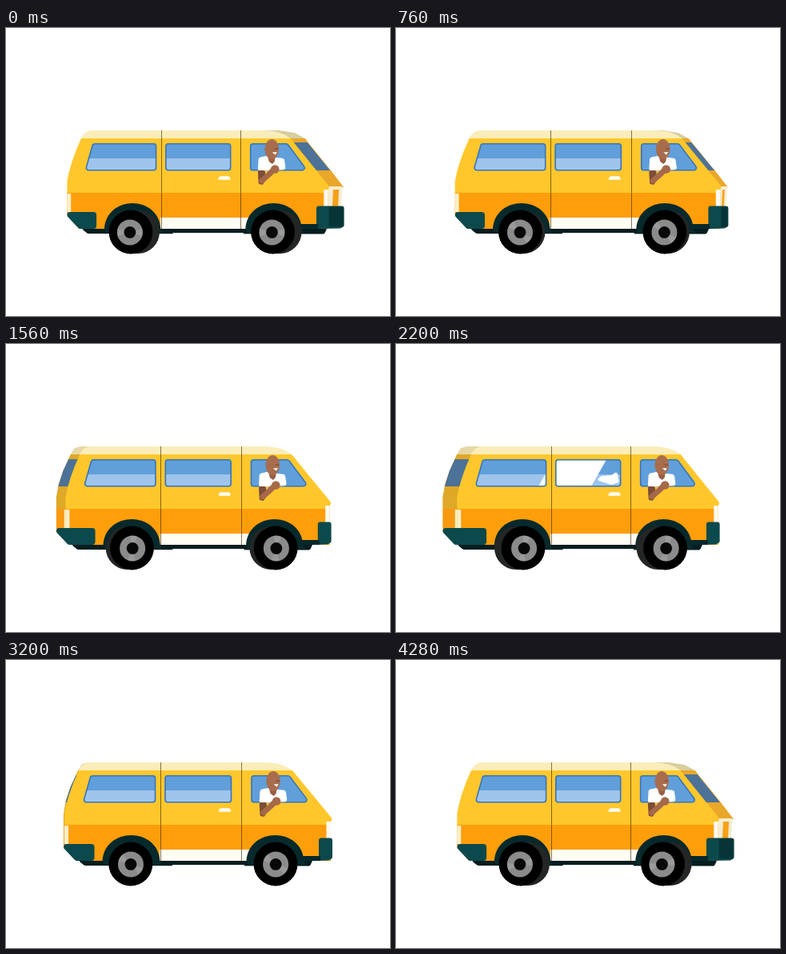
Recreate the animation shown at these times as an HTML page with a canvas. Size 480 by 360 pixels, loop 4.32 s.

```html
<!DOCTYPE html>
<html lang="en">
<head>
<meta charset="utf-8">
<title>Van</title>
<style>
html, body { margin: 0; width: 100%; height: 100%; overflow: hidden; background: #fff; }
canvas { display: block; }
</style>
</head>
<body>
<canvas id="stage" width="480" height="360"></canvas>
<script>
const ctx = document.getElementById('stage').getContext('2d');
const LOOP = 4320, STEP = 40;
const TEAL = '#0c494c', DARK = '#08292c', YELLOW = '#ffc72c', ORANGE = '#ff9e0b', CREAM = '#fbedb9';
const GLASS = '#619fda', SHADED = '#4c7297';

// turn runs from 1 (nose visible) to -1 (tail visible)
let turn = 1, squeeze = 1, nose = 0, tail = 0;
const X = x => 240 + (x - 240) * squeeze;

function fill(path, color) {
  ctx.fillStyle = color;
  ctx.fill(path);
}

function poly(points, radius = 0) {
  const path = new Path2D();
  const n = points.length;
  if (!radius) {
    points.forEach(([x, y]) => path.lineTo(x, y));
  } else {
    const [a, b] = [points[n - 1], points[0]];
    path.moveTo((a[0] + b[0]) / 2, (a[1] + b[1]) / 2);
    points.forEach((p, i) => {
      const q = points[(i + 1) % n];
      path.arcTo(p[0], p[1], q[0], q[1], radius);
    });
  }
  path.closePath();
  return path;
}

const side = points => points.map(([x, y]) => [X(x), y]);

function rect(x1, y1, x2, y2, color) {
  ctx.fillStyle = color;
  ctx.fillRect(X(x1), y1, X(x2) - X(x1), y2 - y1);
}

// strip swept sideways from an edge of the side panel, tucked a little under it
function sweep(points, depth, color) {
  const edge = side(points);
  const tuck = 4 * Math.sign(depth);
  const near = edge.map(([x, y]) => [x - tuck, y]);
  const far = edge.map(([x, y]) => [x + depth, y]).reverse();
  fill(poly([...near, ...far]), color);
}

function disc(x, y, r, color) {
  ctx.fillStyle = color;
  ctx.beginPath();
  ctx.arc(x, y, r, 0, Math.PI * 2);
  ctx.fill();
}

function stroke(points, width, color) {
  ctx.strokeStyle = color;
  ctx.lineWidth = width;
  ctx.lineCap = ctx.lineJoin = 'round';
  ctx.beginPath();
  points.forEach(([x, y]) => ctx.lineTo(x, y));
  ctx.stroke();
}

function bodyPath() {
  const p = new Path2D();
  p.moveTo(X(104), 128);
  p.lineTo(X(325), 128);
  p.quadraticCurveTo(X(345), 128, X(358), 138);
  p.lineTo(X(391), 178);
  p.lineTo(X(407.5), 198);
  p.lineTo(X(406), 203);
  p.lineTo(X(406), 251);
  p.lineTo(X(88), 251);
  p.lineTo(X(73), 232);
  p.lineTo(X(73), 192);
  p.quadraticCurveTo(X(77), 168, X(91), 138);
  p.quadraticCurveTo(X(95), 129, X(104), 128);
  p.closePath();
  return p;
}

function drawNose() {
  if (nose <= 0) return;
  sweep([[325, 128], [345, 131], [358, 138], [362, 143]], nose, '#d8cd9d');
  sweep([[358, 138], [391, 178], [407.5, 199]], nose, '#e9a72b');
  sweep([[362, 143], [391, 178]], nose * 0.95, SHADED);
  sweep([[407.5, 198], [406, 223]], nose * 0.9, '#f6ecd0');
  sweep([[405, 202], [404, 223]], nose * 0.8, '#f7a01a');
  sweep([[406, 202], [405, 223]], nose * 0.35, '#f6ecd0');
}

function drawTail() {
  if (tail >= 0) return;
  sweep([[104, 128], [96, 130], [91, 138]], tail, '#e6d8a4');
  sweep([[91, 138], [81.5, 159], [76, 175], [73, 192], [73, 207]], tail, '#dfa827');
  sweep([[88.5, 144], [81.5, 159], [75.5, 178]], tail, SHADED);
  sweep([[73, 206], [73, 232]], tail, '#f79a12');
  sweep([[73, 207], [73, 230]], tail * 0.14, '#fbefc9');
}

function drawSide() {
  const body = bodyPath();
  ctx.save();
  ctx.clip(body);
  rect(50, 120, 420, 138, CREAM);
  rect(50, 138, 420, 206, YELLOW);
  rect(50, 206, 420, 252, ORANGE);
  rect(192, 237, 306, 251, '#fffdf4');
  rect(72, 207, 78, 230, '#fbefc9');
  rect(400.5, 202, 408, 223, '#fffaf0');
  ctx.fillStyle = 'rgba(70,45,10,.65)';
  for (const x of [192.6, 294]) ctx.fillRect(Math.round(X(x)), 128, 1, 123);
  ctx.restore();
}

function drawSill() {
  const left = 95 + (turn > 0 ? 3 : 15) * turn;
  const right = 380 + 18 * Math.max(turn, 0);
  fill(poly([[left - 6, 249], [right + 4, 249], [right, 257.5], [left + 4, 257]], 2), '#051d20');
  // clear the gap under the thin middle part
  ctx.fillStyle = '#fff';
  ctx.fillRect(X(208), 256, X(298) - X(208), 2);
}

function drawBumpers() {
  const back = X(73) + tail, end = X(110.5);
  fill(poly([[back, 230], [end, 230], [end, 251], [back + 15, 251], [back, 235]], 4), TEAL);
  const front = X(408) + nose;
  fill(poly([[X(391), 222.5], [front, 222.5], [front, 248], [front - 5, 250.5], [X(391), 251]], 3), TEAL);
  if (nose > 1) {
    ctx.fillStyle = 'rgba(0,20,24,.4)';
    ctx.fillRect(X(407), 223.5, nose, 25);
  }
  rect(366, 245, 393, 251, DARK);
}

function drawGlint(x) {
  fill(poly([[x, 178], [x + 20, 143], [x + 86, 143], [x + 66, 178]]), '#fff');
  fill(poly([[x + 72, 170], [x + 79, 165], [x + 92, 164], [x + 98, 159],
    [x + 101, 173], [x + 91, 176], [x + 82, 173]], 2), '#fff');
}

function drawWindow(points, time, lower) {
  const glass = poly(side(points), 3);
  ctx.save();
  ctx.clip(glass);
  rect(90, 140, 385, 163, GLASS);
  rect(90, 163, 385, 180, lower);
  if (time > 1880 && time < 2560 && points[0][0] < 300) drawGlint(178 + (time - 2200) * 0.5);
  ctx.restore();
  ctx.strokeStyle = '#3674bc';
  ctx.lineWidth = 1.6;
  ctx.stroke(glass);
}

function drawDriver() {
  const x = X(333) + 1.6;
  const at = points => points.map(([dx, y]) => [x + dx, y]);
  fill(poly(at([[-17, 162], [-7, 160], [6, 162], [15, 163], [17, 177], [-18, 179]]), 3), '#fff');
  fill(poly(at([[-7, 155], [5, 155], [3, 167], [0, 170], [-4, 167]])), '#985f43');
  ctx.fillStyle = '#a86d4d';
  ctx.beginPath();
  ctx.ellipse(x - 0.5, 151.5, 8.8, 12.5, 0, 0, Math.PI * 2);
  ctx.fill();
  stroke(at([[3, 151], [7, 151]]), 1, '#74442f');
  fill(poly(at([[0, 155.5], [6, 155], [4, 158.5]])), '#fff');
  fill(poly(at([[-18, 178], [-9, 178], [-8, 190], [-12, 196], [-17, 195]]), 2), '#7d4d37');
  stroke(at([[-13, 191], [-4, 183], [1, 178]]), 7, '#a5694a');
  disc(x + 3.5, 176.5, 5.3, '#a5694a');
}

function drawHandle() {
  ctx.fillStyle = '#fffdf4';
  ctx.beginPath();
  ctx.roundRect(X(266), 185.2, 15, 4.6, [4, 4, 1, 1]);
  ctx.fill();
}

function drawArch(cx) {
  const path = new Path2D();
  path.moveTo(X(cx - 36), 252);
  path.bezierCurveTo(X(cx - 34), 208, X(cx + 34), 208, X(cx + 36), 252);
  path.lineTo(X(cx + 39), 256);
  path.lineTo(X(cx - 33), 256);
  fill(path, DARK);
}

function drawWheel(cx, angle) {
  const x = X(cx) - 1.5 * turn, y = 255;
  const hub = x - 1.1 * turn, hubY = y + 0.4, r = 16;
  stroke([[x + 9 * turn, y], [x, y]], 54, '#242626');
  disc(x, y, 27.4, '#000');
  disc(hub, hubY, r, '#8b8b8b');
  ctx.fillStyle = 'rgba(255,255,255,.13)';
  for (const a of [angle, angle + Math.PI]) {
    ctx.beginPath();
    ctx.moveTo(hub, hubY);
    ctx.arc(hub, hubY, r, a - 0.3, a + 0.3);
    ctx.fill();
  }
  disc(hub, hubY, 7.4, '#080808');
}

function draw(time) {
  turn = Math.cos(time / LOOP * Math.PI * 2);
  squeeze = 1 - 0.02 * turn * turn;
  nose = 18 * Math.max(turn, 0);
  tail = 18 * Math.min(turn, 0);
  ctx.fillStyle = '#fff';
  ctx.fillRect(0, 0, 480, 360);

  drawSill();
  drawNose();
  drawTail();
  drawSide();
  drawBumpers();
  drawWindow([[106, 144.7], [186.5, 144.7], [186.5, 177.7], [96.5, 177.7]], time, '#9fc4ec');
  drawWindow([[199, 144.7], [281.5, 144.7], [281.5, 177.7], [199, 177.7]], time, '#9fc4ec');
  drawWindow([[307, 144.7], [354, 144.7], [379, 177.7], [307, 177.7]], time, GLASS);
  drawDriver();
  drawHandle();
  const angle = time / LOOP * Math.PI * 7;
  for (const [arch, hub] of [[156.5, 155.8], [336.5, 337]]) {
    drawArch(arch);
    drawWheel(hub, angle);
  }
}

const start = performance.now();
function tick() {
  const time = (performance.now() - start) % LOOP;
  draw(Math.floor(time / STEP) * STEP);
  requestAnimationFrame(tick);
}
tick();
</script>
</body>
</html>
```
